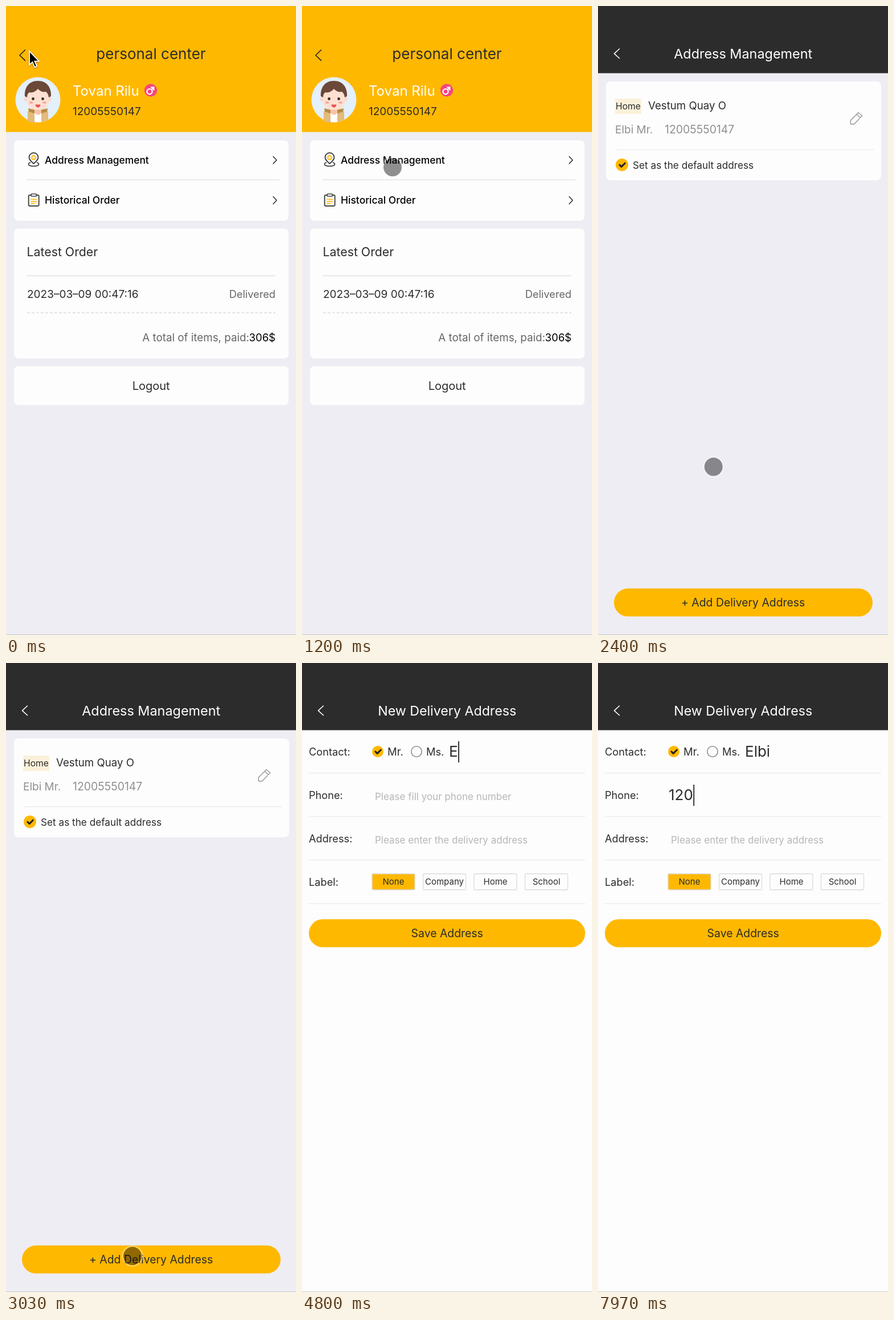
An HTML page for the animation above (8 s loop, 509x1101 px).

```html
<!DOCTYPE html>
<html lang="en">
<head>
<meta charset="utf-8">
<title>Delivery address</title>
<style>
html, body { margin: 0; width: 100%; height: 100%; overflow: hidden; background: #fdfdfd; }
svg { display: block; width: 509px; height: 1101px; }
text { font-family: Inter, "Open Sans", sans-serif; font-weight: 400; white-space: pre; }
.strong { font-weight: 500; }
.line { fill: none; stroke-linecap: round; stroke-linejoin: round; }
</style>
</head>
<body>
<svg id="stage" viewBox="0 0 509 1101" xmlns="http://www.w3.org/2000/svg"></svg>
<script>
const YELLOW = '#ffb800', DARK = '#2c2c2c', WHITE = '#fdfdfd', PAGE = '#eeedf4', HINT = '#b7b7bb', RULE = '#ebebeb';
const PHONE = '12005550147', CONTACT = 'Elbi', LOOP = 8000;

const text = (x, y, size, str, fill = DARK, anchor = 'start', more = '') =>
  `<text x="${x}" y="${y}" font-size="${size}" fill="${fill}" text-anchor="${anchor}" ${more}>${str}</text>`;
const rect = (x, y, w, h, fill, r = 0, more = '') =>
  `<rect x="${x}" y="${y}" width="${w}" height="${h}" rx="${r}" fill="${fill}" ${more}/>`;
const circle = (x, y, r, fill, more = '') => `<circle cx="${x}" cy="${y}" r="${r}" fill="${fill}" ${more}/>`;
const line = (d, stroke, width = 1.5) => `<path class="line" d="${d}" stroke="${stroke}" stroke-width="${width}"/>`;
const fill = (d, color) => `<path d="${d}" fill="${color}"/>`;
const group = (id, body, more = '') => `<g id="${id}" ${more}>${body}</g>`;

const checked = (x, y, r) => circle(x, y, r, YELLOW) + line(`M${x - 4.2} ${y}l3.3 3.4 6.2-6.2`, '#222', 3);
const unchecked = (x, y, r) => circle(x, y, r, 'none', 'stroke="#8c8c8c" stroke-width="1.6"');
const darkHeader = rect(0, 0, 509, 117.6, DARK) + line('M37.5 75L28.5 83.3 37.5 91.5', '#fff', 1.6);
const title = (str, size) => text(254.7, 92, size, str, '#fff', 'middle');

const avatar = circle(56, 164, 39.5, '#e4f0fa') +
  fill('M38 202V186Q39 180 48 180H64Q73 180 74 186V199Q58 207 38 202Z', '#e3bb7b') +
  fill('M50 182H62V203Q56 204 50 203Z', '#fff') +
  fill('M39 179L50 182V188L40 185ZM73 179L62 182V188L72 185Z', '#b98b45') +
  fill('M50 178H62V187Q56 194 50 187Z', '#f6c3aa') +
  circle(35.5, 163, 3.5, '#fbd5c3') + circle(76, 163, 3.5, '#fbd5c3') +
  fill('M36 152Q37 144 56 144T76 152V163Q75 182 56 182T36 163Z', '#fde0d2') +
  fill('M33 158C32 142 41 131 56 131S80 142 79 158L75 160Q74 153 70 150Q62 152 56 145Q49 153 41 151Q37 154 37 160Z', '#6b4838') +
  circle(47.5, 162.5, 2.4, '#3a2a26') + circle(64.5, 162.5, 2.4, '#3a2a26') +
  '<ellipse cx="44" cy="169" rx="3.4" ry="2" fill="#f9aaa0"/><ellipse cx="67.5" cy="169" rx="3.4" ry="2" fill="#f9aaa0"/>' +
  fill('M51.5 172.5H60.5Q60 177.5 56 177.5T51.5 172.5Z', '#ea5558');

const badge = circle(254, 147.5, 11, '#f8437f') +
  circle(252, 149.7, 4.6, 'none', 'stroke="#fff" stroke-width="2.3"') +
  line('M255.5 146.2L259 142.7M254.8 142.3H259.4V146.9', '#fff', 2.2);

const pin = line('M48.5 276C43 271 40.5 268.5 40.5 265A8 8 0 0 1 56.5 265C56.5 268.5 54 271 48.5 276Z', '#444', 1.9) +
  circle(48.5, 265.5, 3.3, 'none', `stroke="${YELLOW}" stroke-width="1.9"`) +
  line('M42.5 274Q39.5 275 39.5 277.2C40 281.5 57 281.5 57.5 277.2Q57.5 275 54.5 274', '#444', 1.8);

const clipboard = rect(39.7, 331, 18, 19, 'none', 2, 'stroke="#444" stroke-width="1.9"') +
  rect(44.2, 329, 9, 4, WHITE, 1, 'stroke="#444" stroke-width="1.7"') +
  line('M44 338.5H54M44 342.3H54M44 346H50.5', YELLOW, 1.7);

const chevron = y => line(`M469 ${y - 6}l6 6.3-6 6.3`, '#222', 1.4);

const profile = rect(0, 0, 509, 1101, PAGE) + rect(0, 0, 509, 220.6, YELLOW) +
  line('M33.5 77L24 86.2 33.5 95.4', '#222', 1.6) +
  text(254.5, 92.7, 26, 'personal center', DARK, 'middle') +
  avatar + text(117, 157, 24, 'Tovan Rilu', '#fff') + badge + text(117, 191, 19, PHONE) +
  rect(14, 235, 482, 141, WHITE, 8) + rect(14, 389.5, 482, 227.5, WHITE, 8) + rect(14, 630.5, 482, 68, WHITE, 8) +
  pin + text(68, 276, 17.4, 'Address Management', '#000', 'start', 'class="strong"') + chevron(269.5) +
  rect(37, 303.5, 443, 1.5, '#e4e4e4') +
  clipboard + text(68, 346, 17.5, 'Historical Order', '#000', 'start', 'class="strong"') + chevron(339.8) +
  text(36.5, 438, 21.3, 'Latest Order') + rect(37, 471, 436, 2.3, '#e9e9e9') +
  text(37, 511, 19, '2023–03–09 00:47:16') + text(473, 511, 18.2, 'Delivered', '#666', 'end') +
  '<path d="M37 537H473" stroke="#e4e4e4" stroke-width="2" stroke-dasharray="5 3"/>' +
  text(427, 587, 18.8, 'A total of items, paid:', '#666', 'end') + text(473, 587, 18.5, '306$', '#000', 'end') +
  text(254.7, 672, 20, 'Logout', DARK, 'middle');

const addresses = rect(0, 0, 509, 1101, PAGE) + darkHeader + rect(14, 132, 483, 173, WHITE, 8) +
  line('M459 197L449.5 206.7H443.3V200.3L457 186.5 463.7 192.3 460.3 195.5 454.5 190', '#999') +
  rect(28, 1019.6, 454, 49, YELLOW, 24.5) +
  group('loading', rect(30, 277.5, 454, 1.3, RULE) + checked(42, 305, 11) + unchecked(79, 305, 10.3)) +
  group('loaded', title('Address Management', 23.4) + rect(30, 162, 46, 27, '#fbf1da', 1) +
    text(31, 181, 15.7, 'Home') + text(88, 181, 18.7, 'Vestum Quay O') +
    text(30, 222.5, 19, CONTACT + ' Mr.', '#909090') + text(117, 222.5, 19.4, PHONE, '#909090') +
    rect(30, 251, 454, 1.3, RULE) + checked(42, 278, 11) +
    text(61, 285, 17.2, 'Set as the default address') +
    text(254.7, 1051, 19.4, '+ Add Delivery Address', DARK, 'middle'));

const rows = ['Contact:', 'Phone:', 'Address:', 'Label:'].map((label, i) =>
  text(12, 162 + 76 * i, 18.2, label) + rect(12, 192 + 76.2 * i, 485, 1.3, RULE)).join('');
const chips = ['None', 'Company', 'Home', 'School'].map((label, i) => {
  const x = 123 + 89.5 * i;
  return rect(x, 369, 75, 28, i ? WHITE : YELLOW, 1.5, 'stroke="#dcdcdc" stroke-width="1.3"') +
    text(x + 37.5, 388, 15, label, DARK, 'middle');
}).join('');

const form = rect(0, 0, 509, 1101, WHITE) + darkHeader + title('New Delivery Address', 23.2) + rows +
  checked(133, 155, 10) + text(150, 162, 18.5, 'Mr.') + unchecked(201, 155, 9.2) + text(218, 162, 18.2, 'Ms.') +
  text(264, 164, 17, 'Please fill your salutation', HINT, 'start', 'id="hint0" clip-path="url(#field)"') +
  text(128, 240, 17, 'Please fill your phone number', HINT, 'start', 'id="hint1"') +
  text(128, 316, 17, 'Please enter the delivery address', HINT) +
  text(258, 164, 26, '', DARK, 'start', 'id="value0"') + text(124, 240, 26, '', DARK, 'start', 'id="value1"') +
  rect(0, 0, 1.8, 37, '#222', 0, 'id="caret"') + chips +
  rect(12, 448.5, 485, 49, YELLOW, 24.5) + text(254.7, 480, 19.4, 'Save Address', DARK, 'middle');

const stage = document.getElementById('stage');
stage.innerHTML = '<clipPath id="field"><rect x="258" y="130" width="204" height="50"/></clipPath>' +
  group('profile', profile) + group('addresses', addresses) + group('form', form) +
  rect(0, 1100, 509, 1, '#c6c6c8') +
  group('touch', circle(0, 0, 17.3, 'none', 'stroke="#fff" stroke-opacity=".33" stroke-width="2.6"') +
    circle(0, 0, 16, '#000', 'fill-opacity=".435"')) +
  group('arrow', '<path d="M0 0V24L5.5 19 9.3 28 13 26.3 9.3 17.7H17Z" fill="#000" stroke="#fff" stroke-width="1.8"/>',
    'style="filter:drop-shadow(0 1px 1.5px rgba(0,0,0,.35))"');

const $ = id => document.getElementById(id);
const show = (id, on) => $(id).setAttribute('display', on ? 'inline' : 'none');

// time, x, y of the pointer
const path = [[60, 41, 79], [800, 159, 283], [1800, 159, 281], [2750, 222, 1038], [3350, 222, 1038],
  [3590, 354, 140], [3830, 354, 140], [4150, 345, 157], [5500, 345, 157], [6050, 291, 236.5], [LOOP, 291, 236.5]];
// time from which each pointer look holds
const looks = [[0, 'arrow'], [60, 'touch'], [1600, 'arrow'], [1830, 'touch'], [3200, 'arrow'], [3370, 'touch'],
  [4700, ''], [5500, 'touch'], [6950, '']];
// focus, blur and key times of the two inputs
const inputs = [
  { x: 258, y: 137, value: CONTACT, focus: 4200, blur: 6350, keys: [4700, 4880, 5060, 5270] },
  { x: 124, y: 213, value: PHONE, focus: 6350, blur: LOOP, keys: [6950, 7350, 7720] }];

function pointerAt(t) {
  const i = path.findIndex(p => p[0] > t);
  if (i < 1) return path[0].slice(1);
  const [t0, x0, y0] = path[i - 1], [t1, x1, y1] = path[i];
  const k = (t - t0) / (t1 - t0), e = k * k * (3 - 2 * k);
  return [x0 + (x1 - x0) * e, y0 + (y1 - y0) * e];
}

function drawInput(input, i, t) {
  const count = input.keys.filter(k => k <= t).length, value = $('value' + i);
  value.textContent = input.value.slice(0, count);
  show('hint' + i, !count);
  if (t < input.focus || t >= input.blur) return;
  const since = t - (count ? input.keys[count - 1] : input.focus);
  const width = count ? value.getComputedTextLength() : 0;
  $('caret').setAttribute('x', input.x + width + 0.5);
  $('caret').setAttribute('y', input.y);
  show('caret', since % 1000 < 500);
}

function draw(t) {
  show('profile', t < 1600);
  show('addresses', t >= 1600 && t < 3200);
  show('loading', t < 1690);
  show('loaded', t >= 1690);
  show('form', t >= 3200);
  show('caret', false);
  inputs.forEach((input, i) => drawInput(input, i, t));
  const look = looks.filter(l => l[0] <= t).pop()[1], [x, y] = pointerAt(t);
  for (const id of ['touch', 'arrow']) {
    show(id, id === look);
    $(id).setAttribute('transform', `translate(${x} ${y})`);
  }
}

const start = performance.now();
(function tick() {
  draw((performance.now() - start) % LOOP);
  requestAnimationFrame(tick);
})();
</script>
</body>
</html>
```
